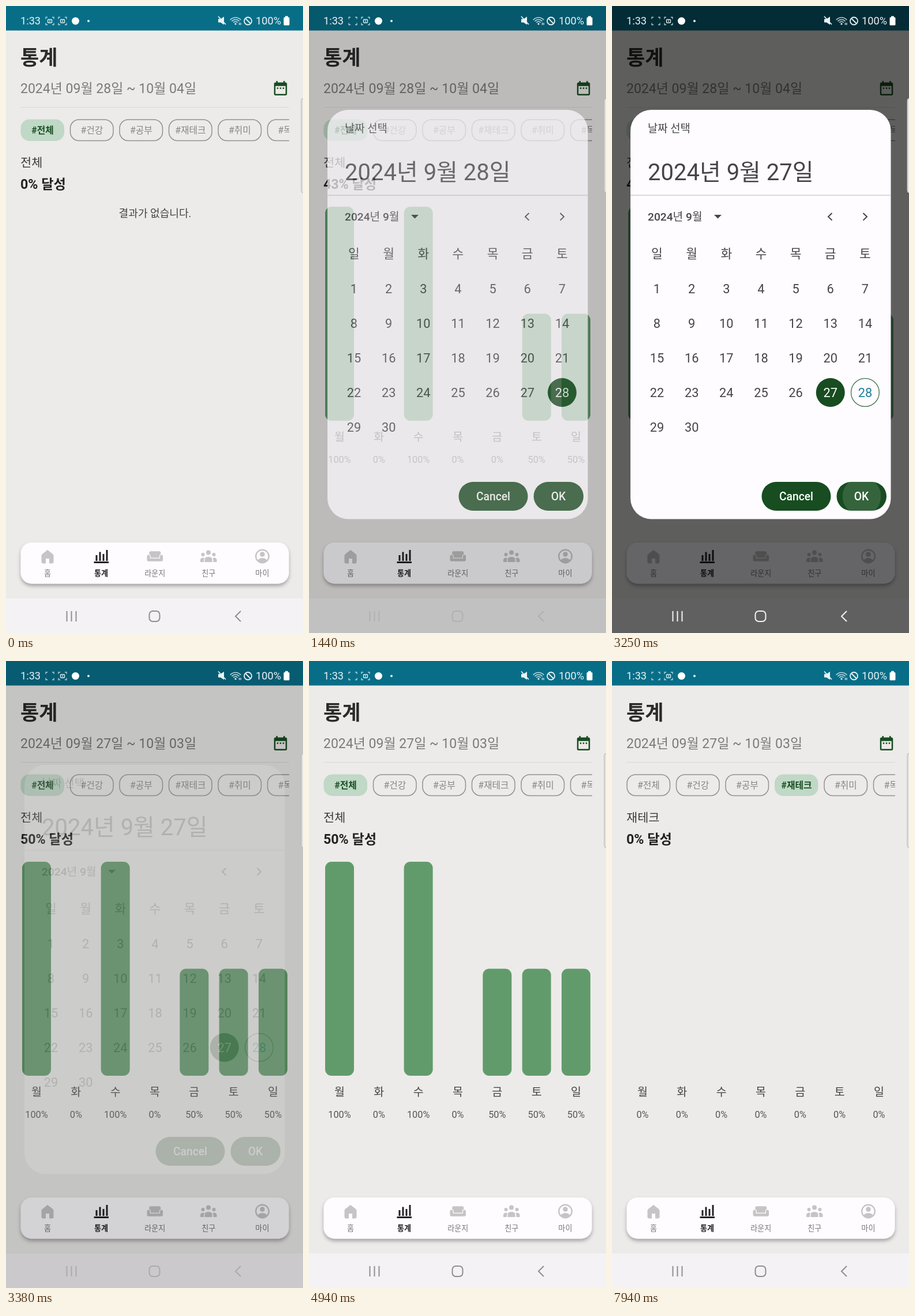
Write an HTML page that moves like this. It is 515 px wide and 1087 px high and loops after 8 s.

```html
<!DOCTYPE html>
<html lang="ko">
<head>
<meta charset="utf-8">
<style>
html, body { margin: 0; width: 100%; height: 100%; overflow: hidden; background: #ecebe9; }
svg { display: block; width: 515px; height: 1087px; font-family: Roboto, "Noto Sans CJK KR", "Noto Sans CJK", sans-serif; }
.mid { text-anchor: middle; }
.b { font-weight: 700; }
.m { font-weight: 500; }
.line { fill: none; stroke: currentColor; stroke-width: 2; }

.anim, .step { animation: 8s linear infinite; }
.step { opacity: 0; animation-timing-function: step-end; }
@keyframes loading { 0% { opacity: 1 } 1.56% { opacity: 0 } }
@keyframes week28 { 0% { opacity: 0 } 1.56% { opacity: 1 } 42.2% { opacity: 0 } }
@keyframes week27 { 0% { opacity: 0 } 42.2% { opacity: 1 } 65.6% { opacity: 0 } }
@keyframes health { 0% { opacity: 0 } 65.6% { opacity: 1 } 83.6% { opacity: 0 } }
@keyframes invest { 0% { opacity: 0 } 83.6%, 100% { opacity: 1 } }
@keyframes blink { 0% { opacity: 1 } .75% { opacity: 0 } }
@keyframes before { 0% { opacity: 1 } 34.4% { opacity: 0 } }
@keyframes after { 0% { opacity: 0 } 34.4%, 100% { opacity: 1 } }
@keyframes dim { 0%, 17.25% { opacity: 0 } 19.5%, 40.9% { opacity: .6 } 42.8%, 100% { opacity: 0 } }
@keyframes dialog { 0%, 17.25% { opacity: 0 } 18.34%, 40.9% { opacity: 1 } 42.5%, 100% { opacity: 0 } }
@keyframes keys { 0%, 17.25% { color: #8f8d8f } 19.5%, 40.9% { color: #f4f2f4 } 42.8%, 100% { color: #8f8d8f } }
@keyframes ripple {
  0%, 39.87% { opacity: 0; transform: scale(.16) }
  39.88% { opacity: .13; transform: scale(.16) }
  40.625% { opacity: .13; transform: scale(.66) }
  41.3% { opacity: .13; transform: scale(1) }
  42.5%, 100% { opacity: 0; transform: scale(1) }
}
</style>
</head>
<body>
<svg id="stage" viewBox="0 0 515 1087"></svg>
<script>
const GREEN = '#174d20';
const DAYS = [...'일월화수목금토'];
const TAGS = ['전체', '건강', '공부', '재테크', '취미', '독서'];

const text = (x, y, size, color, str, cls = '') =>
  `<text x="${x}" y="${y}" font-size="${size}" fill="${color}" class="${cls}">${str}</text>`;
const rect = (x, y, w, h, r, fill, more = '') =>
  `<rect x="${x}" y="${y}" width="${w}" height="${h}" rx="${r}" fill="${fill}" ${more}/>`;
const circle = (x, y, r, fill, more = '') =>
  `<circle cx="${x}" cy="${y}" r="${r}" fill="${fill}" ${more}/>`;
const path = (d, more = '') => `<path d="${d}" ${more}/>`;
const step = (name, body) => `<g class="step" style="animation-name:${name}">${body}</g>`;
const anim = (name, body) => `<g class="anim" style="animation-name:${name}">${body}</g>`;
const each = (list, fn) => list.map(fn).join('');

function tags(active) {
  return `<g clip-path="url(#tagClip)">` + each(TAGS, (name, i) => {
    const x = 25.5 + i * 85.5, on = i === active;
    const box = on ? rect(x, 196.5, 75.5, 37.5, 15, '#c0d8c6')
      : rect(x + .5, 197, 74.5, 36.5, 15, 'none', 'stroke="#929191" stroke-width="1.5"');
    return box + text(x + 38, 221, 15.8, on ? GREEN : '#878686', '#' + name, on ? 'mid b' : 'mid');
  }) + '</g>';
}

function chart(values) {
  return each(values, (v, i) => {
    const x = 53 + i * 68.33, h = v * 3.71;
    return (v ? rect(x - 25, 719 - h, 50, h, 11, '#629b6b') : '') +
      text(x, 754, 19.5, '#444', DAYS[(i + 1) % 7], 'mid') +
      text(x, 791.5, 16.3, '#555', v + '%', 'mid');
  });
}

function page(name, range, active, percent, values) {
  return step(name,
    text(25, 150.5, 23, '#7b7a7a', range) + tags(active) +
    text(25, 278.5, 20.8, '#3a3a3a', TAGS[active]) +
    text(25, 316.5, 23.2, '#222', percent + '% 달성', 'b') +
    (values ? chart(values) : text(258.5, 365.5, 18.1, '#444', '결과가 없습니다.', 'mid')));
}

function tabs() {
  const gray = '#c6c5c5', ink = '#222';
  const icons =
    path('M72 943.5L81 950.5Q82 951.3 82 952.5V964Q82 966 80 966H75.5V957.5H68.5V966H64Q62 966 62 964V952.5Q62 951.3 63 950.5Z',
      `fill="${gray}" stroke="${gray}" stroke-linejoin="round"`) +
    path('M152.5 964.5H178M157 962V952M163 962V946.5M169 962V950M175 962V943', `stroke="${ink}" stroke-width="3"`) +
    path('M21 10c-1.1 0-2 .9-2 2v3H5v-3c0-1.1-.9-2-2-2s-2 .9-2 2v5c0 1.1.9 2 2 2h18c1.1 0 2-.9 2-2v-5c0-1.1-.9-2-2-2zM18 5H6c-1.1 0-2 .9-2 2v2.15c1.16.41 2 1.51 2 2.82V14h12v-2.03c0-1.3.84-2.4 2-2.82V7c0-1.1-.9-2-2-2z',
      `fill="${gray}" transform="translate(243.3 939) scale(1.25)"`) +
    each([[341.5, 951, 3], [351, 947.5, 4], [360.5, 951, 3]], p => circle(...p, gray)) +
    path('M337 964v-3q0-4.5 5-4.5q1.5 0 2.2.7q-1.2 1.6-1.2 4v2.8zM344.500 964v-4q0-5 6.500-5t6.500 5v4zM365.500 964v-3q0-4.500-5-4.500q-1.500 0-2.200.700q1.200 1.600 1.200 4v2.800z', `fill="${gray}"`) +
    circle(444.5, 954, 11.3, 'none', `stroke="${gray}" stroke-width="2.4"`) +
    circle(444.5, 950.5, 4.3, gray) +
    path('M436.500 961q2.500-4 8-4t8 4q-3 4-8 4t-8-4z', `fill="${gray}"`);
  const names = ['홈', '통계', '라운지', '친구', '마이'];
  return rect(25.5, 930, 465, 71.5, 19, '#fefcff', 'filter="url(#shadow)"') + icons +
    each(names, (n, i) => text(72 + i * 93.1, 988, 13.1, i === 1 ? ink : '#777', n, i === 1 ? 'mid b' : 'mid'));
}

function statusIcons() {
  const c = '#eaf3f6';
  const frame = x => path(`M${x - 4} 19.500h-3v3M${x + 4} 19.500h3v3M${x - 4} 32.500h-3v-3M${x + 4} 32.500h3v-3`,
    `fill="none" stroke="${c}" stroke-width="1.3" opacity=".8"`);
  const core = x => rect(x - 3.5, 23.5, 7, 5.5, 1, 'none', `stroke="${c}" stroke-width="1.3"`) + circle(x, 26.2, 1, c);
  const arc = r => path(`M${398 - r * .77} ${32 - r * .64}A${r} ${r} 0 0 1 ${398 + r * .77} ${32 - r * .64}`,
    `fill="none" stroke="${c}" stroke-width="1.6" opacity=".8"`);
  return text(25, 32, 18.2, c, '1:33') + frame(76) + step('blink', core(76)) + frame(98) + core(98) +
    circle(120.5, 26, 6.5, '#fff') + circle(143, 26, 2, c) +
    path('M368 22.500h4l6-4v14l-6-4h-4z', `fill="${c}"`) +
    path('M368 18l13 14', `stroke="${c}" stroke-width="1.8"`) +
    each([5, 8.5, 12], arc) + circle(398, 31, 1.6, c) +
    path('M404.500 33v-4M407 29v4', `stroke="${c}" stroke-width="1.2"`) +
    circle(419.5, 26, 6.5, 'none', `stroke="${c}" stroke-width="1.8"`) +
    path('M415 21.500l9 9', `stroke="${c}" stroke-width="1.800"`) +
    text(433, 32, 18.2, c, '100%') + rect(481.5, 19.5, 10, 14, 1.5, '#fff') + rect(484, 17.5, 5, 3, .5, '#fff');
}

function picker() {
  const ink = '#454446';
  const col = i => 78 + i * 60.15;
  const day = (n, color = ink) =>
    text(col((n - 1) % 7), 497.5 + Math.floor((n - 1) / 7) * 60.1, 21.8, color, n, 'mid');
  const picked = n => circle(col((n - 1) % 7), 670, 25, GREEN) + day(n, '#fff');
  const title = n => text(62, 302, 40, ink, `2024년 9월 ${n}일`);
  const plain = Array.from({ length: 30 }, (_, i) => i + 1).filter(n => n !== 27 && n !== 28);
  return rect(32, 180, 451.5, 709.5, 36, '#fefcff') +
    text(62, 218.5, 18.8, ink, '날짜 선택', 'm') +
    rect(32, 327.5, 451.5, 1.3, 0, '#cac8cb') +
    text(62, 371.5, 19.2, ink, '2024년 9월', 'm') +
    path('M177 362h13l-6.500 6.500z', `fill="${ink}"`) +
    path('M381.500 359l-6.500 6.300l6.500 6.300M435.500 359l6.500 6.300l-6.500 6.300', `class="line" color="${ink}"`) +
    each(DAYS, (d, i) => text(col(i), 437, 21.5, ink, d, 'mid')) +
    each(plain, n => day(n)) +
    step('before', title(28) + day(27) + picked(28)) +
    step('after', title(27) + picked(27) +
      circle(col(6), 670, 24.4, 'none', 'stroke="#3f704a" stroke-width="1.3"') + day(28, '#1b7f9b')) +
    rect(259.5, 825, 120, 50, 25, GREEN) + rect(389.5, 825, 86.5, 50, 25, GREEN) +
    `<g clip-path="url(#okClip)"><circle class="anim" r="50" cx="433" cy="850" fill="#fff"
      style="animation-name:ripple;transform-origin:433px 850px"/></g>` +
    text(319.5, 856.5, 19.3, '#fff', 'Cancel', 'mid m') + text(432.5, 856.5, 19.3, '#fff', 'OK', 'mid m');
}

const WEEK28 = '2024년 09월 28일 ~ 10월 04일';
const WEEK27 = '2024년 09월 27일 ~ 10월 03일';

document.getElementById('stage').innerHTML = `
  <defs>
    <clipPath id="tagClip">${rect(25, 190, 465.5, 50, 0, '#000')}</clipPath>
    <clipPath id="okClip">${rect(389.5, 825, 86.5, 50, 25, '#000')}</clipPath>
    <filter id="shadow" x="-10%" y="-20%" width="120%" height="160%">
      <feDropShadow dx="0" dy="4" stdDeviation="3" flood-opacity=".3"/>
    </filter>
  </defs>` +
  rect(0, 0, 515, 1087, 0, '#ecebe9') +
  rect(0, 0, 515, 42.5, 0, '#086e88') +
  text(25, 101.5, 35, '#2b2b2b', '통계', 'b') +
  path('M9 11H7v2h2v-2zm4 0h-2v2h2v-2zm4 0h-2v2h2v-2zm2-7h-1V2h-2v2H8V2H6v2H5c-1.11 0-1.99.9-1.99 2L3 20c0 1.1.89 2 2 2h14c1.1 0 2-.9 2-2V6c0-1.1-.9-2-2-2zm0 16H5V9h14v11z',
    `fill="${GREEN}" transform="translate(461 127.500) scale(1.25)"`) +
  rect(25.5, 175, 465, 1.2, 0, '#dbdad8') +
  page('loading', WEEK28, 0, 0) +
  page('week28', WEEK28, 0, 43, [100, 0, 100, 0, 0, 50, 50]) +
  page('week27', WEEK27, 0, 50, [100, 0, 100, 0, 50, 50, 50]) +
  page('health', WEEK27, 1, 29, [100, 0, 0, 0, 0, 100, 0]) +
  page('invest', WEEK27, 3, 0, [0, 0, 0, 0, 0, 0, 0]) +
  tabs() +
  rect(0, 1027, 515, 60, 0, '#f4f2f4') +
  anim('dim', rect(0, 0, 515, 1087, 0, '#000')) +
  statusIcons() +
  rect(512, 160, 10, 164, 4, '#e3e2e2', 'stroke="#b5b4b4"') +
  anim('keys', path('M105.500 1049v18M113.500 1049v18M121.500 1049v18M407 1049l-9 9l9 9', 'class="line"') +
    rect(248.5, 1049, 18, 18, 6, 'none', 'class="line"')) +
  anim('dialog', picker());
</script>
</body>
</html>
```
